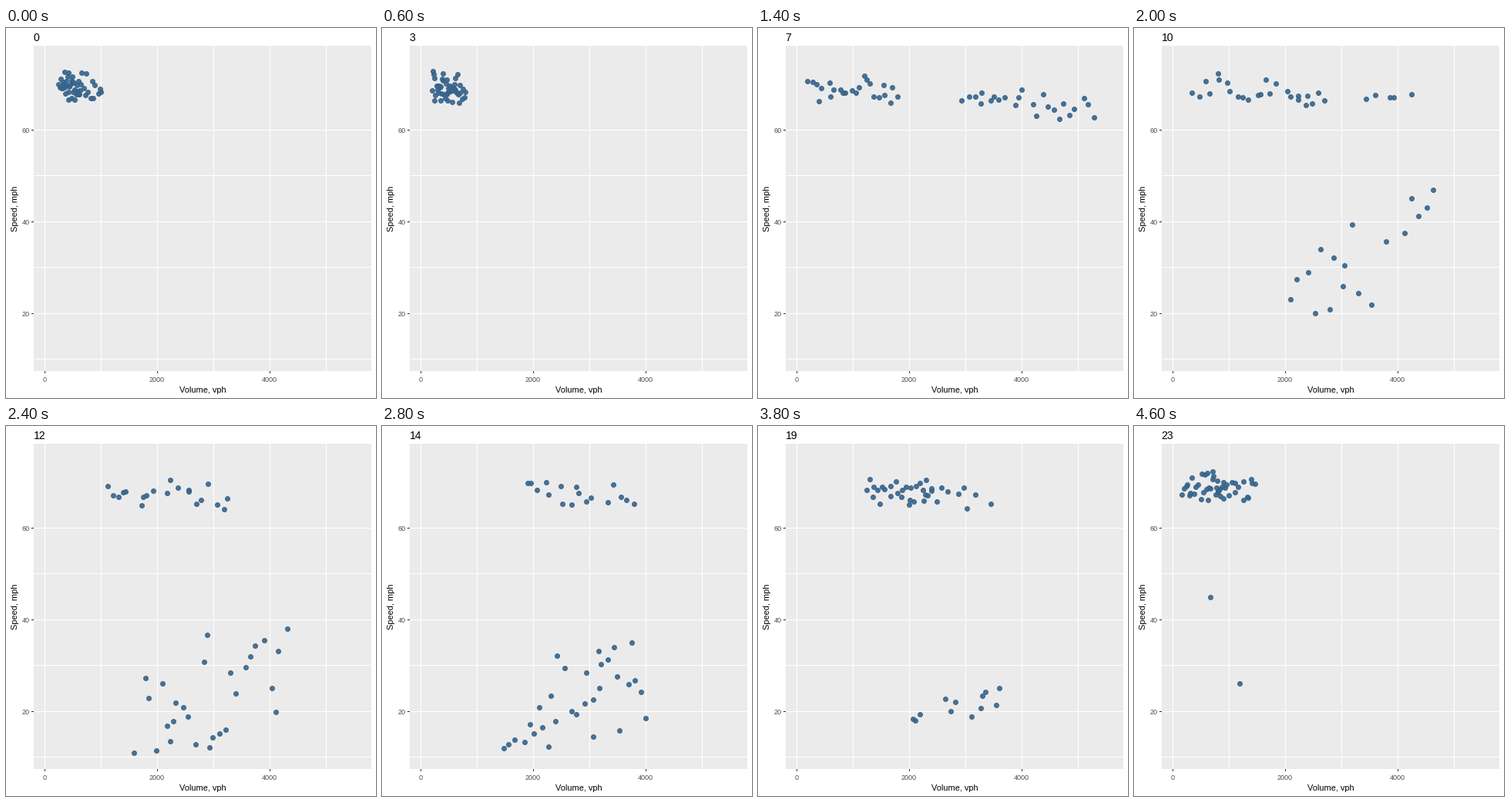
A matplotlib script that plays this animation: 480x480 px, repeating every 4800 ms.

```python
import matplotlib.pyplot as plt
import numpy as np
from matplotlib.animation import FuncAnimation
from matplotlib.patches import Rectangle

SIZE, DPI = 480, 100
PX = 72 / DPI
HOURS, STEP_MS = 24, 200
SITES = 24  # counting sites in each direction
LEFT, RIGHT, TOP, BOTTOM = 36, 474, 23, 445

# Daily profiles, interpolated between key hours
DAY = [0, 3, 6, 10, 14, 19, 23]
OUTBOUND = ([250, 200, 150, 340, 1900, 1240, 170],
            [640, 700, 1500, 2700, 3800, 2400, 900])
INBOUND = ([300, 240, 3200, 2100, 1480, 2000, 600],
           [1000, 800, 5500, 4630, 4000, 3600, 1470])
JAM = [9, 10, 12, 14, 17, 19, 22]
JAM_COUNT = [0, 18, 28, 31, 29, 12, 2]
JAM_SPEED = ([50, 20, 11, 12, 15, 18, 26],
             [56, 47, 38, 35, 36, 25, 45])


def to_x(volume):
    return 50 + 0.073 * volume


def to_y(speed):
    return 132.5 + 5.94 * (60 - speed)


def site_volumes(rng, hour, profile):
    """Spread the sites unevenly between the hour's volume limits."""
    low, high = (np.interp(hour, DAY, edge) for edge in profile)
    steps = np.linspace(0, 1, SITES)
    steps[1:-1] += rng.uniform(-0.6, 0.6, SITES - 2) / SITES
    return rng.permutation(low + (high - low) * steps)


def jam_speeds(rng, hour, volume):
    """Busier sites tend to move a little faster inside a jam."""
    low, high = (np.interp(hour, JAM, edge) for edge in JAM_SPEED)
    rank = np.argsort(np.argsort(volume + rng.normal(0, 900, len(volume))))
    return low + (high - low) * (rank / max(len(volume) - 1, 1)) ** 1.25


def hour_dots(hour):
    rng = np.random.default_rng(hour + 40)
    volume = np.concatenate([site_volumes(rng, hour, OUTBOUND),
                             site_volumes(rng, hour, INBOUND)])
    noise = np.clip(rng.normal(0, 1.6, 2 * SITES), -3.2, 3.2)
    speed = 70 - 0.0011 * volume + noise
    jammed = round(np.interp(hour, JAM, JAM_COUNT))
    if jammed:
        speed[-jammed:] = jam_speeds(rng, hour, volume[-jammed:])
    return np.column_stack([to_x(volume), to_y(speed)])


fig = plt.figure(figsize=(SIZE / DPI, SIZE / DPI), dpi=DPI, facecolor="white")
ax = fig.add_axes([0, 0, 1, 1])
ax.set_xlim(0, SIZE)
ax.set_ylim(SIZE, 0)
ax.axis("off")


def label(x, y, text, size, color="black", **kw):
    kw.setdefault("va", "baseline")
    return ax.text(x, y, text, fontsize=size * PX, color=color,
                   family="Liberation Sans", **kw)


def line(xs, ys, color, z=1):
    ax.plot(xs, ys, color=color, lw=PX, solid_capstyle="butt",
            snap=False, zorder=z)


ax.add_patch(Rectangle((LEFT, TOP), RIGHT - LEFT, BOTTOM - TOP,
                       fc="#EBEBEB", lw=0, zorder=0))
for volume in range(0, 6000, 1000):
    x = np.floor(to_x(volume)) + 0.5
    line([x, x], [TOP, BOTTOM], "white")
    if volume % 2000 == 0:
        line([x, x], [BOTTOM, BOTTOM + 3], "#333333", 2)
        label(x - 0.5, 459, str(volume), 9, "#4D4D4D", ha="center")
for speed in range(10, 70, 10):
    y = np.floor(to_y(speed)) + 0.5
    line([LEFT, RIGHT], [y, y], "white")
    if speed % 20 == 0:
        line([LEFT - 3, LEFT], [y, y], "#333333", 2)
        label(31, y + 3.5, str(speed), 9, "#4D4D4D", ha="right")
label(255, 473, "Volume, vph", 11, ha="center")
label(17, 234.5, "Speed, mph", 11, rotation=90, ha="right", va="center")

title = label(35.5, 17, "0", 14)
dots = ax.scatter([], [], s=(6 * PX) ** 2, color="#36648B", alpha=0.9,
                  linewidths=PX, zorder=3)


def draw(hour):
    title.set_text(str(hour))
    dots.set_offsets(hour_dots(hour))
    return title, dots


anim = FuncAnimation(fig, draw, frames=HOURS, init_func=lambda: draw(0),
                     interval=STEP_MS, repeat=True, repeat_delay=0)
plt.show()
```
